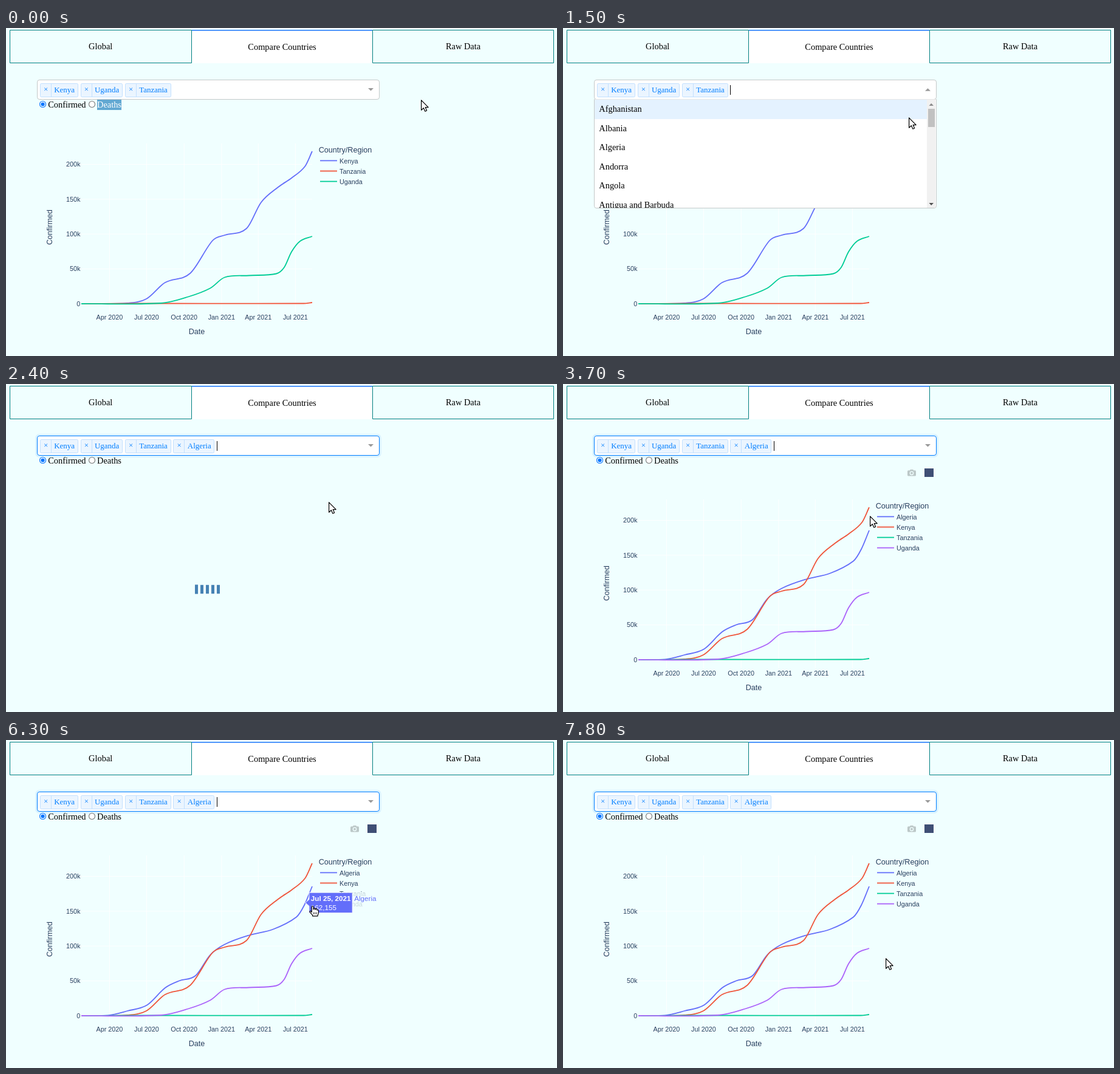
An HTML page for the animation above (8 s loop, 907 by 540 pixels).

```html
<!DOCTYPE html>
<html lang="en">
<head>
<meta charset="utf-8">
<title>Compare Countries</title>
<style>
  html, body { margin: 0; width: 100%; height: 100%; overflow: hidden; background: #f0ffff; }
  svg { display: block; width: 907px; height: 540px; }
  text { white-space: pre; }
  .serif { font: 14.4px "Liberation Serif", serif; }
  .chip { font: 12.96px "Liberation Serif", serif; fill: #007eff; }
  .tick { font: 10.8px "Liberation Sans", sans-serif; fill: #2a3f5f; }
  .title { font: 12.6px "Liberation Sans", sans-serif; fill: #2a3f5f; }
  .tip { font: 11.7px "Liberation Sans", sans-serif; }
  .bold { font-weight: bold; }
  .mid { text-anchor: middle; }
  .end { text-anchor: end; }
</style>
</head>
<body>
<svg id="stage" viewBox="0 0 907 540"></svg>
<script>
const LOOP = 8000, STEP = 100;
const OPEN = 1000, PICK = 2400, READY = 3200;
const COLORS = ['#636efa', '#ef553b', '#00cc96', '#ab63fa'];
const stage = document.getElementById('stage');

function el(tag, attrs, parent = stage, content) {
  const node = document.createElementNS('http://www.w3.org/2000/svg', tag);
  for (const k in attrs) node.setAttribute(k, attrs[k]);
  if (content !== undefined) node.textContent = content;
  parent.appendChild(node);
  return node;
}
const group = (parent = stage) => el('g', {}, parent);
const rect = (x, y, width, height, fill, parent, more) =>
  el('rect', { x, y, width, height, fill, ...more }, parent);
const path = (d, attrs, parent) => el('path', { d, fill: 'none', ...attrs }, parent);
const text = (x, y, str, cls, parent, more) =>
  el('text', { x, y, class: cls, ...more }, parent, str);
const show = (node, on) => node.setAttribute('visibility', on ? 'inherit' : 'hidden');

// Chart scales: days since 22 Jan 2020, thousands of cases
const DAY = 864e5, FIRST = Date.UTC(2020, 0, 22);
const dayX = day => 123.4 + .671 * day;
const casesY = k => 454 - 1.1475 * k;
const dateText = (day, parts) => new Date(FIRST + day * DAY)
  .toLocaleDateString('en-US', { month: 'short', year: 'numeric', timeZone: 'UTC', ...parts });

// Bends of each curve in stage pixels
const SERIES = {
  Algeria: [[124, 454], [168, 453.3], [200, 446], [232, 436.5], [262, 408], [285, 396.5], [312, 388],
    [336, 354], [360, 336.5], [400, 321.5], [440, 311.5], [478, 291.5], [491, 272], [504, 241]],
  Kenya: [[124, 454], [200, 453], [231, 446], [262, 419], [303, 404], [340, 350], [360, 341],
    [396, 330], [420, 287], [448, 262], [470, 247], [492, 228], [504, 203]],
  Tanzania: [[124, 454], [215, 453.5], [490, 453.5], [504, 452]],
  Uganda: [[124, 454], [255, 453], [300, 442.5], [336, 428.5], [360, 410.5], [400, 407.5],
    [445, 404.5], [458, 394], [470, 368.5], [484, 351], [504, 343]]
};

// Smooth path whose slope at each bend follows its neighbours
function curve(pts) {
  const at = i => pts[Math.max(0, Math.min(pts.length - 1, i))];
  const slope = i => {
    const [p, q] = [at(i - 1), at(i + 1)];
    return (q[1] - p[1]) / (q[0] - p[0]);
  };
  return pts.slice(1).reduce((d, c, i) => {
    const b = pts[i], w = (c[0] - b[0]) / 3;
    return d + `C${b[0] + w},${b[1] + w * slope(i)} ${c[0] - w},${c[1] - w * slope(i + 1)} ${c}`;
  }, `M${pts[0]}`);
}

function drawTabs() {
  path('M6.5 3.5H305.5V57.5H6.5ZM603.5 3.5H901.5V57.5H603.5Z', { stroke: '#007f80' });
  rect(306, 3, 297, 55, '#fff');
  rect(306, 3, 297, 1.5, '#1975fa');
  text(155.7, 35, 'Global', 'serif mid');
  text(454.5, 36, 'Compare Countries', 'serif mid');
  text(752.5, 35, 'Raw Data', 'serif mid');
}

function drawRadios() {
  const ring = (cx, stroke) =>
    el('circle', { cx, cy: 125.5, r: 5, fill: '#fff', stroke, 'stroke-width': 1.1 });
  ring(60.5, '#0075ff');
  el('circle', { cx: 60.5, cy: 125.5, r: 3.1, fill: '#0075ff' });
  ring(141.5, '#767676');
  text(69.2, 131, 'Confirmed', 'serif');
  text(150, 131, 'Deaths', 'serif');
  const marked = group();
  rect(150, 118, 40, 17, '#62a8d2', marked);
  text(150, 131, 'Deaths', 'serif', marked, { fill: '#fff' });
  return marked;
}

function drawAxes(parent) {
  for (let month = 3; month <= 18; month += 3) {
    const day = (Date.UTC(2020, month, 1) - FIRST) / DAY, x = dayX(day);
    path(`M${x} 190V468`, { stroke: '#fff', 'stroke-width': .9 }, parent);
    text(x, 480, dateText(day), 'tick mid', parent);
  }
  for (let k = 0; k <= 200; k += 50) {
    const y = casesY(k);
    path(`M124 ${y}H504`, { stroke: '#fff', 'stroke-width': k ? .9 : 1.8 }, parent);
    text(122.3, y + 3.8, k ? k + 'k' : '0', 'tick end', parent);
  }
  text(314, 504, 'Date', 'title mid', parent);
  text(0, 0, 'Confirmed', 'title mid', parent, { transform: 'translate(76 328) rotate(-90)' });
  text(514.7, 205, 'Country/Region', 'title', parent);
}

function drawChart(names) {
  const g = group();
  drawAxes(g);
  names.forEach((name, i) => {
    const pen = { stroke: COLORS[i], 'stroke-width': 1.8, 'stroke-linejoin': 'round' };
    const y = 218.4 + i * 17.1;
    path(curve(SERIES[name]), pen, g);
    path(`M517 ${y}H545`, pen, g);
    text(549, y + 4.2, name, 'tick', g);
  });
  return g;
}

function drawModebar() {
  const g = group();
  rect(567, 142.3, 14, 9.2, '#bcc8c8', g, { rx: 1.5 });
  rect(571.2, 140.7, 5.6, 3, '#bcc8c8', g, { rx: 1 });
  el('circle', { cx: 574, cy: 146.8, r: 2.7, fill: 'none', stroke: '#f0ffff', 'stroke-width': 1.3 }, g);
  rect(595, 139, 15, 14, '#3f4f75', g);
  return g;
}

// Five bars stretching in turn; the page stalls briefly before they run
function drawLoader() {
  const g = group();
  const bars = [0, 1, 2, 3, 4].map(i => rect(311 + 9 * i, 0, 5, 0, '#4682b4', g));
  const ease = u => u < .5 ? 2 * u * u : 1 - 2 * (1 - u) * (1 - u);
  return t => {
    show(g, t >= PICK && t < READY);
    const clock = (t < PICK + 300 ? PICK : t) - PICK + 33;
    bars.forEach((bar, i) => {
      const phase = Math.max(0, (clock - 100 * i) / 1200) % 1;
      const h = 36 * (.4 + .6 * ease(Math.max(0, 1 - Math.abs(phase / .2 - 1))));
      bar.setAttribute('y', 338 - h / 2);
      bar.setAttribute('height', h);
    });
  };
}

function drawSelect() {
  const glow = rect(49.65, 83.65, 566.7, 35.7, 'none', stage,
    { rx: 5, stroke: '#007eff', 'stroke-opacity': .1, 'stroke-width': 2.7 });
  const shade = path('M54 118.5H612', { stroke: '#000', 'stroke-opacity': .06 });
  const box = rect(51.5, 85.5, 563, 32, '#fff', stage, { rx: 3.6 });
  const arrow = path('', { fill: '#999' });
  let x = 56.2;
  const chips = ['Kenya', 'Uganda', 'Tanzania', 'Algeria'].map(name => {
    const g = group(), left = Math.floor(x);
    const frame = rect(left + .5, 91.5, 0, 22, '#ebf5ff', g, { rx: 1.8, stroke: '#c2e0ff' });
    path(`M${left + 18.5} 92V113`, { stroke: '#c2e0ff' }, g);
    text(x + 9.4, 105, '×', 'chip mid', g);
    const label = text(x + 23, 106, name, 'chip', g);
    const width = label.getComputedTextLength();
    frame.setAttribute('width', Math.round(width + 28));
    x += width + 33;
    return g;
  });
  const caret = rect(275, 94, 1, 16, '#000');
  return t => {
    const focus = t >= PICK, open = t >= OPEN && !focus;
    show(glow, focus);
    show(shade, t >= 500 && t < OPEN);
    show(chips[3], focus);
    box.setAttribute('stroke', focus ? '#007eff' : '#c4c8c8');
    arrow.setAttribute('d', open ? 'M596 103.8H605L600.5 99.3Z' : 'M596 99H605L600.5 103.5Z');
    caret.setAttribute('x', focus ? 347 : 275);
    const blink = Math.floor((t - (focus ? PICK - 100 : OPEN)) / 600) % 2 === 0;
    show(caret, t >= OPEN && blink);
  };
}

function drawMenu() {
  const ROW = 31.5, g = group();
  rect(52, 118, 562, 178, '#fff', el('clipPath', { id: 'list' }, g));
  path('M51.5 117.5H614.5V293Q614.5 296.5 611 296.5H55Q51.5 296.5 51.5 293Z',
    { fill: '#fff', stroke: '#c4c8c8' }, g);
  path('M52 117.5H614', { stroke: '#e6e6e6' }, g);
  const list = el('g', { 'clip-path': 'url(#list)' }, g);
  const hover = rect(52, 118, 547, 32, '#e4f2ff', list);
  ['Afghanistan', 'Albania', 'Algeria', 'Andorra', 'Angola', 'Antigua and Barbuda']
    .forEach((name, i) => text(59.3, Math.round(138 + ROW * i), name, 'serif', list));
  rect(599, 118, 14, 178, '#f1f1f1', list);
  rect(601, 133, 11, 30, '#c1c1c1', list);
  path('M602.5 128H610L606.2 124Z', { fill: '#8a8a8a' }, list);
  path('M602.5 288H610L606.2 292Z', { fill: '#505050' }, list);
  return (t, y) => {
    show(g, t >= OPEN && t < PICK);
    const row = Math.max(0, Math.floor((y - 118) / ROW));
    hover.setAttribute('y', 118 + ROW * row);
  };
}

// Hover labels: start time, day, cases, series
const TIPS = [
  [4000, 560, 205470, 'Kenya'],
  [5000, 548, 195898, 'Kenya'],
  [5200, 557, 172564, 'Algeria'],
  [6100, 554, 168668, 'Algeria'],
  [6300, 550, 162155, 'Algeria']
];
const TIP_END = 6400;

function drawTip([, day, cases, name]) {
  const [color, ink] = name === 'Kenya' ? [COLORS[1], '#444'] : [COLORS[0], '#fff'];
  const g = el('g', { transform: `translate(${dayX(day) + .3} ${casesY(cases / 1000)})` });
  const back = rect(0, -16.8, 0, 33.6, '#f0ffff', g, { 'fill-opacity': .8 });
  const shape = path('', { fill: color, stroke: ink, 'stroke-width': .9 }, g);
  const head = text(9, -2.9, dateText(day, { day: 'numeric' }), 'tip bold', g, { fill: ink });
  text(9, 12, cases.toLocaleString('en-US'), 'tip', g, { fill: ink });
  const right = head.getComputedTextLength() + 11.8;
  const side = text(right + 3, -2.9, name, 'tip', g, { fill: color });
  back.setAttribute('x', right);
  back.setAttribute('width', side.getComputedTextLength() + 5.6);
  shape.setAttribute('d', `M0 0L6.2 5.4V16.8H${right}V-16.8H6.2V-5.4Z`);
  return g;
}

function drawPointer() {
  const g = group();
  const pen = { fill: '#fff', stroke: '#000', 'stroke-width': 1.2, 'stroke-linejoin': 'round' };
  const arrow = path('M.6 .8V17.2L4.4 13.7L6.9 19.2L9.6 18L7.2 12.6H12.2Z', pen, g);
  const hand = group(g);
  path('M-1.3 9.6V.9Q-1.2-.5 .2-.5Q1.6-.5 1.6 .9V5.2Q3-.1 4.4 5.5Q6 0 7.2 5.9Q9.8 5 9.9 7.8V11.2' +
    'Q9.8 13 8.6 14.2V15.8H.1V14.3L-4.3 9.4Q-4.9 7.8-3.4 7.5Q-2.3 7.7-1.3 9.6Z', pen, hand);
  path('M2 9.5V13M4.4 9.5V13M6.8 9.5V13', { stroke: '#000', 'stroke-width': .8 }, hand);
  return ([x, y], overLine) => {
    g.setAttribute('transform', `translate(${x} ${y})`);
    show(arrow, !overLine);
    show(hand, overLine);
  };
}

// Pointer moves: start and end time, then where it comes to rest
const HOME = [683, 118];
const MOVES = [
  [0, 600, 575, 100], [1200, 1500, 569, 147], [1500, 1800, 531, 194], [3200, 3700, 505, 217],
  [3800, 4100, 501, 223], [4900, 5000, 498, 236], [5000, 5300, 502, 258],
  [5900, 6300, 504.5, 274], [6300, 6600, 528, 346], [7400, 7800, 531, 359]
];
const pointerAt = t => MOVES.reduce(([x, y], [from, to, x2, y2]) => {
  const u = Math.max(0, Math.min(1, (t - from) / (to - from)));
  return [x + (x2 - x) * u, y + (y2 - y) * u];
}, HOME);

drawTabs();
const before = drawChart(['Kenya', 'Tanzania', 'Uganda']);
const after = drawChart(['Algeria', 'Kenya', 'Tanzania', 'Uganda']);
const modebar = drawModebar();
const loader = drawLoader();
const select = drawSelect();
const marked = drawRadios();
const menu = drawMenu();
const tips = TIPS.map(drawTip);
const pointer = drawPointer();

function render(t) {
  const spot = pointerAt(t);
  show(before, t < PICK);
  show(after, t >= READY);
  show(modebar, t > READY);
  show(marked, t < OPEN);
  loader(t);
  select(t);
  menu(t, spot[1]);
  const active = t < TIP_END ? TIPS.filter(tip => t >= tip[0]).length - 1 : -1;
  tips.forEach((tip, i) => show(tip, i === active));
  pointer(spot, active >= 0);
}

// The screen updates ten times a second
const start = performance.now();
function tick() {
  const t = (performance.now() - start) % LOOP;
  render(Math.floor(t / STEP) * STEP);
  requestAnimationFrame(tick);
}
tick();
</script>
</body>
</html>
```
